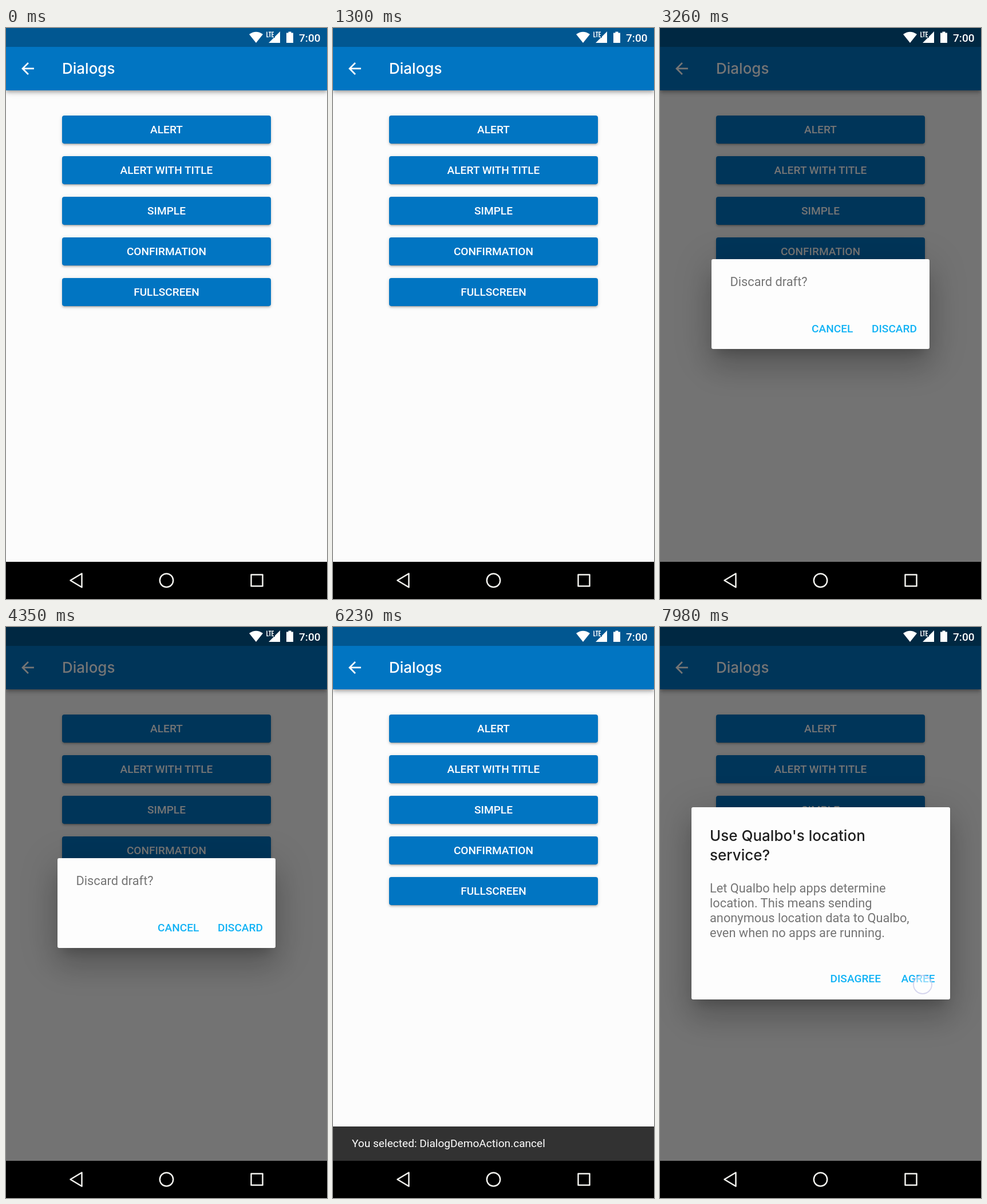
Recreate the animation shown at these times as an HTML page. Size 561x998 px, loop 8 s.

```html
<!DOCTYPE html>
<html lang="en">
<head>
<meta charset="utf-8">
<title>Dialogs</title>
<style>
  html, body { margin: 0; width: 100%; height: 100%; overflow: hidden; background: #fcfcfc; }
  #stage { position: relative; width: 561px; height: 998px; overflow: hidden; background: #fcfcfc; }
  #stage div, svg { position: absolute; }
  .text { line-height: 0; white-space: pre; font-family: Roboto, sans-serif; }
  .title { font: 500 26px/0 Inter, sans-serif; }
  .label { font-size: 19.1px; font-weight: 500; }
  .small { font-size: 19.1px; }
  .body { font-size: 21.8px; color: #757575; }
  .center { transform: translateX(-50%); }
  .white { color: #fff; }
  .accent { color: #13b3f5; }
  .dark { color: #202020; }
  .bar { background: #0175c2; box-shadow: 0 3px 5px -1px #0003, 0 5px 7px #0002, 0 1px 14px #0002; }
  .button { background: #0175c2; border-radius: 4px; box-shadow: 0 4px 1px -3px #0003, 0 3px 3px #0002, 0 1px 7px #0002; }
  .dialog { background: #fdfdfd; border-radius: 3px;
    box-shadow: 0 15px 20px -9px #0003, 0 33px 52px 4px #00000024, 0 12px 63px 11px #0000001f; }
  .touch { box-sizing: border-box; border: 2px solid #b4b4e08c; border-radius: 50%; background: #ffffff80; }
</style>
</head>
<body>
<div id="stage"></div>
<script>
const LOOP = 8000;
const stage = document.getElementById('stage');

function box(parent, x, y, w, h, cls = '', background = '') {
  const el = document.createElement('div');
  el.className = cls;
  Object.assign(el.style, { left: x + 'px', top: y + 'px', width: w + 'px', height: h + 'px' });
  if (background) el.style.background = background;
  return parent.appendChild(el);
}

// y is the middle of the capital letters
function text(parent, x, y, string, cls) {
  const el = document.createElement('div');
  el.className = 'text ' + cls;
  el.style.left = x + 'px';
  el.style.top = y + 'px';
  el.textContent = string;
  return parent.appendChild(el);
}

function icons(parent, markup) {
  parent.insertAdjacentHTML('beforeend', `<svg width="561" height="998">${markup}</svg>`);
}

// steps: [time, value, smooth?]; a value holds until the next step unless smooth
function play(el, prop, steps) {
  const frames = steps.map(([t, v, smooth]) =>
    ({ offset: t / LOOP, [prop]: v, easing: smooth ? 'linear' : 'step-end' }));
  frames.push({ offset: 1, [prop]: steps[steps.length - 1][1] });
  el.animate(frames, { duration: LOOP, iterations: Infinity });
}

function show(el, from, to = LOOP) {
  const steps = [[0, 0], [from, 1]];
  if (to < LOOP) steps.push([to, 0]);
  play(el, 'opacity', steps);
}

function touch(x, y, start, full, fade, end) {
  const steps = [[0, 0], [start, .4, true], [full, 1]];
  if (end) steps.push([fade, 1, true], [end, 0]);
  play(box(stage, x - 17, y - 17, 34, 34, 'touch'), 'opacity', steps);
}

// Page
box(stage, 0, 0, 561, 109, 'bar');
box(stage, 0, 0, 561, 33, '', '#015791');
icons(stage, `<path fill="#fff" transform="translate(21.6 54.6) scale(1.364)"
  d="M20 11H7.83l5.59-5.59L12 4l-8 8 8 8 1.41-1.41L7.83 13H20z"/>`);
text(stage, 98, 71, 'Dialogs', 'title white');
['ALERT', 'ALERT WITH TITLE', 'SIMPLE', 'CONFIRMATION', 'FULLSCREEN'].forEach((name, i) => {
  box(stage, 98, 153 + 71 * i, 365, 49, 'button');
  text(stage, 280.5, 178 + 71 * i, name, 'label white center');
});

// Snackbar
const snack = box(stage, 0, 873, 561, 72, '', '#323232');
text(snack, 33, 30, 'You selected: DialogDemoAction.cancel', 'small white');
show(snack, 4940, 7850);
play(snack, 'transform', [[0, 'none'], [6530, 'translateY(11px)']]);

// Dialogs
const scrim = box(stage, 0, 0, 561, 933, '', 'rgba(0,0,0,.54)');
play(scrim, 'opacity', [[0, 0], [3260, 1], [4940, 0], [6400, 1]]);

const draft = box(stage, 90, 404, 381, 157, 'dialog');
text(draft, 32.5, 40, 'Discard draft?', 'body');
text(draft, 175, 122, 'CANCEL', 'label accent');
text(draft, 280, 122, 'DISCARD', 'label accent');
show(draft, 3260, 4940);

const place = box(stage, 54.5, 315, 452, 335.5, 'dialog');
["Use Qualbo's location", 'service?'].forEach((line, i) =>
  text(place, 32.5, 50 + 33.5 * i, line, 'title dark'));
['Let Qualbo help apps determine', 'location. This means sending',
 'anonymous location data to Qualbo,', 'even when no apps are running.'].forEach((line, i) =>
  text(place, 32.5, 141.5 + 26 * i, line, 'body'));
text(place, 243, 300, 'DISAGREE', 'label accent');
text(place, 367, 300, 'AGREE', 'label accent');
show(place, 6400);

// Taps
touch(290, 176, 1760, 1900, 2050, 2210);
touch(293, 533, 3650, 3800, 4140, 4350);
touch(301, 249, 6080, 6150, 6200, 6230);
touch(459, 625, 7850, 7980);

// System bars
box(stage, 0, 933, 561, 65, '', '#000');
icons(stage, `
  <g fill="#fff">
    <path d="M425 11Q437 2.500 449 11L437 26z"/>
    <path d="M479 6V26H459L468.500 16.500V17H470V15z"/>
    <path d="M493.500 6.500h5v2h3.500v17.500h-12v-17.500h3.500z"/>
  </g>
  <path fill="none" stroke="#fff" stroke-width="1.500" d="M456 6.500v9h3M459 7.200h4.500M461.200 7v9M468 7.200h-3v8.300h3M465 11.300h2.700"/>
  <g fill="none" stroke="#f2f2ee" stroke-width="2.500" stroke-linejoin="round">
    <path d="M112.500 965.500L132.500 953.500V977.500z"/>
    <circle cx="280.500" cy="965.500" r="11.700"/>
    <rect x="428.500" y="955.500" width="20" height="20"/>
  </g>`);
text(stage, 512, 17.5, '7:00', 'label white');
</script>
</body>
</html>
```
